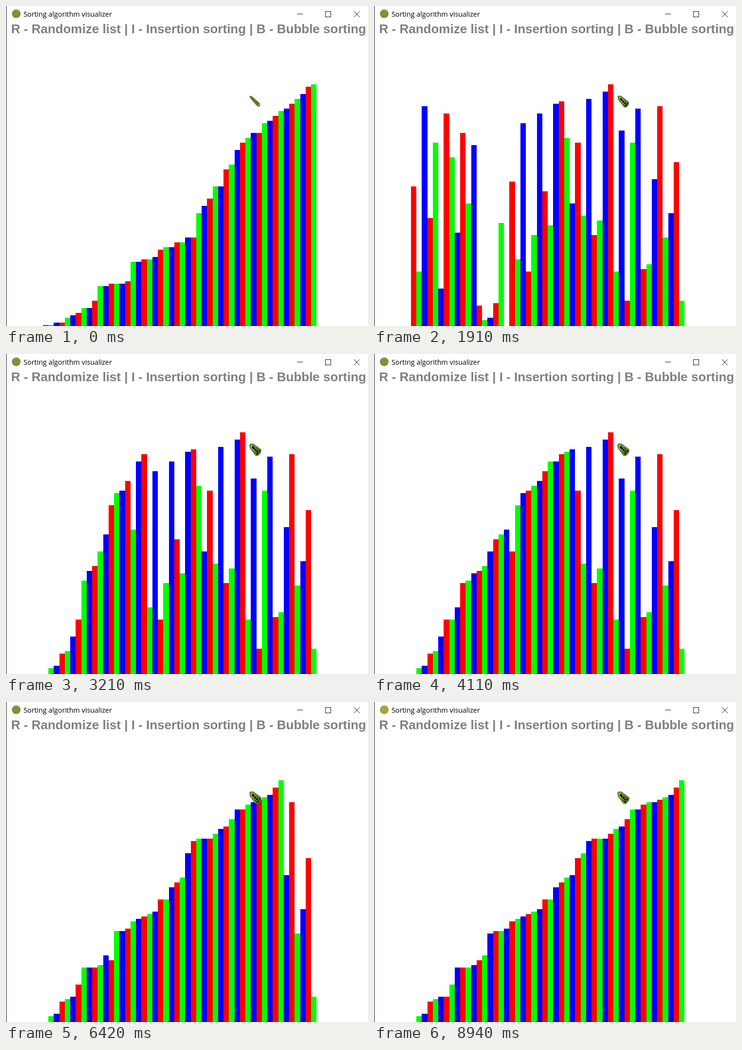
Animation of 744x658 px, one loop 9.05 s. Source, as an HTML page with a canvas:

```html
<!DOCTYPE html>
<html lang="en">
<head>
<meta charset="utf-8">
<title>Sorting algorithm visualizer</title>
<style>
  html, body { margin: 0; width: 100%; height: 100%; overflow: hidden; background: #fff; }
  canvas { display: block; }
</style>
</head>
<body>
<canvas id="stage" width="744" height="658"></canvas>
<script>
const ctx = document.getElementById('stage').getContext('2d');
const LOOP = 9050;
const SHUFFLE_AT = 910;
const SORT_AT = 2081;
const SWAPS_PER_MS = 0.0972;
const BAR_COLORS = ['#ff0000', '#00ff00', '#0000ff'];

const previousList = [
  1, 1, 2, 2, 4, 5, 6, 8, 8, 11, 17, 17, 18, 18, 18, 19, 27, 27, 28, 28, 29, 32, 33, 33, 35,
  35, 37, 37, 47, 50, 53, 58, 58, 65, 67, 73, 76, 78, 80, 80, 84, 85, 87, 89, 90, 92, 94, 96, 99, 100];
const shuffledList = [
  58, 23, 91, 45, 76, 16, 88, 70, 39, 80, 51, 75, 9, 3, 4, 10, 43, 0, 60, 28, 84, 23, 38, 88, 56,
  42, 92, 93, 78, 51, 76, 46, 94, 38, 44, 97, 100, 23, 81, 11, 76, 90, 24, 26, 61, 91, 37, 47, 68, 11];

// Insertion sort, stopped after the given number of swaps.
function insertionSort(source, swaps) {
  const list = source.slice();
  for (let i = 1; i < list.length; i++) {
    for (let j = i; j > 0 && list[j - 1] > list[j]; j--) {
      if (swaps-- <= 0) return list;
      [list[j - 1], list[j]] = [list[j], list[j - 1]];
    }
  }
  return list;
}

// The screen is sampled about ten times a second.
function sampleTime(t) {
  const offset = t < 4920 ? 10 : 20;
  return Math.max(0, Math.floor((t - offset) / 100) * 100 + offset);
}

function listAt(t) {
  if (t < SHUFFLE_AT) return previousList;
  const swaps = Math.floor((t - SORT_AT) * SWAPS_PER_MS);
  return insertionSort(shuffledList, Math.max(0, swaps));
}

function drawBars(list) {
  const edge = i => Math.round(75.75 + i * 11.25);
  list.forEach((value, i) => {
    const top = 661 - value * 5;
    ctx.fillStyle = BAR_COLORS[i % 3];
    if (top < 658) ctx.fillRect(edge(i), top, edge(i + 1) - edge(i), 658 - top);
  });
}

function drawText(text, font, color, x, y) {
  ctx.font = font;
  ctx.fillStyle = color;
  ctx.fillText(text, x, y);
}

function drawWindow(t) {
  ctx.fillStyle = '#10221f';
  ctx.fillRect(0, 0, 1, 658);

  ctx.fillStyle = t < 7000 ? '#7d9140' : '#aaa044';
  ctx.beginPath();
  ctx.arc(21, 16, 9, 0, Math.PI * 2);
  ctx.fill();

  drawText('Sorting algorithm visualizer', '14.3px "Open Sans", "Noto Sans", sans-serif', '#000', 36, 22);
  drawText('R - Randomize list | I - Insertion sorting | B - Bubble sorting',
    'bold 26px "Liberation Sans", Arial, sans-serif', '#808080', 10.6, 56);

  ctx.strokeStyle = '#111';
  ctx.lineWidth = 1;
  ctx.strokeRect(656.5, 11.5, 11, 11);
  ctx.beginPath();
  ctx.moveTo(598, 16.5); ctx.lineTo(610, 16.5);
  ctx.moveTo(715, 11); ctx.lineTo(727, 23);
  ctx.moveTo(727, 11); ctx.lineTo(715, 23);
  ctx.stroke();
}

function polygon(points, color) {
  ctx.beginPath();
  points.forEach(([x, y]) => ctx.lineTo(x, y));
  ctx.closePath();
  ctx.fillStyle = color;
  ctx.fill();
}

// Pointer that slowly rolls about its long axis, from edge-on to flat.
function drawPointer(t) {
  const half = 3.6 + 5 * Math.sin(Math.min(1, t / 4000) * Math.PI / 2);
  const hull = (grow, end) => [
    [1 - grow, -1 - grow], [5, -half * 0.65 - grow], [25, -half - grow],
    [end, -half * 0.4], [end, half * 0.6], [26, half + grow], [6, half * 0.65 + grow], [1 - grow, 1 + grow]];
  ctx.save();
  ctx.translate(501, 185);
  ctx.rotate(Math.PI / 4);
  polygon(hull(0.3, 29), '#26380c');
  polygon(hull(-0.7, 28), '#78b828');
  if (t < 500) {
    polygon([[6, -1], [25, -1.5], [25, 1.5], [6, 1]], '#4b6b12');
  } else {
    polygon([[7, -half * 0.4], [26, -half * 0.7], [27, half * 0.7], [8, half * 0.4]], '#0b1205');
    ctx.fillStyle = '#d5e8b8';
    ctx.fillRect(8, -half * 0.4, 16, 1);
    ctx.fillRect(8, half * 0.3, 16, 1);
    ctx.fillStyle = '#78b828';
    const shift = Math.floor(t / 100) % 3;
    for (let x = 12 + shift; x < 25; x += 5) ctx.fillRect(x, -half * 0.25, 1.2, half * 0.5);
  }
  ctx.restore();
}

function render(now) {
  const t = sampleTime(now % LOOP);
  ctx.fillStyle = '#fff';
  ctx.fillRect(0, 0, 744, 658);
  const cleared = t >= 1110 && t < 1210;
  if (!cleared) drawBars(listAt(t));
  drawWindow(t);
  drawPointer(t);
}

let start;
function tick(now) {
  start ??= now;
  render(now - start);
  requestAnimationFrame(tick);
}
render(0);
requestAnimationFrame(tick);
</script>
</body>
</html>
```
